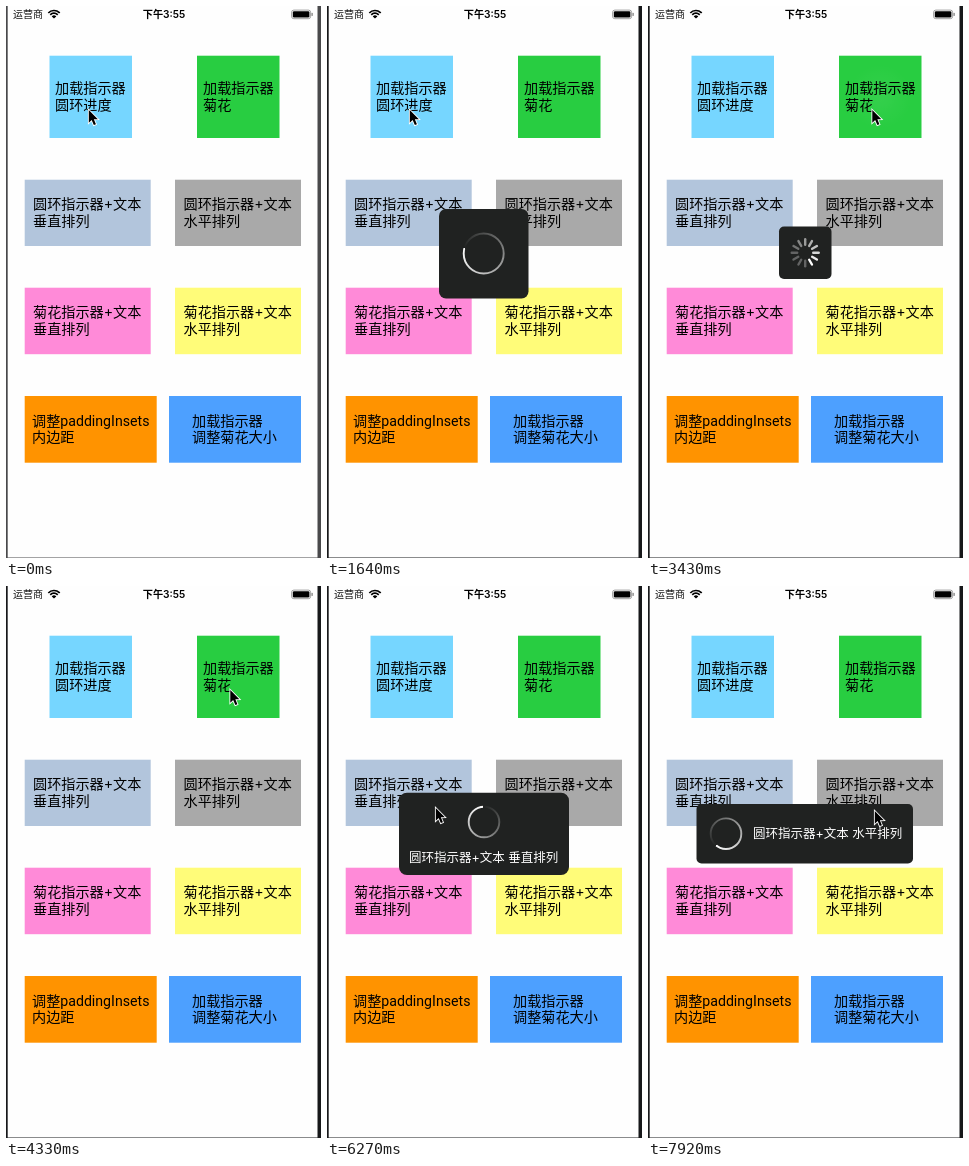
Recreate the animation shown at these times as an HTML page with a canvas. Size 315 by 552 pixels, loop 8000 ms.

```html
<!DOCTYPE html>
<html lang="zh">
<head>
<meta charset="utf-8">
<title>加载指示器</title>
<style>
html, body { margin: 0; width: 100%; height: 100%; overflow: hidden; background: #fff; }
canvas { display: block; width: 315px; height: 552px; }
</style>
</head>
<body>
<canvas id="stage"></canvas>
<script>
const W = 315, H = 552, LOOP = 8000;
const FONT = 'Inter, "Noto Sans CJK SC", "Noto Sans CJK", sans-serif';
const LATIN = 'Roboto, "Noto Sans CJK SC", "Noto Sans CJK", sans-serif';
const canvas = document.getElementById('stage');
const ratio = window.devicePixelRatio || 1;
canvas.width = W * ratio;
canvas.height = H * ratio;
const ctx = canvas.getContext('2d');
ctx.scale(ratio, ratio);

const buttons = [
  { x: 43.5, y: 49.7, w: 82.5, h: 82.3, color: '#76d6ff', tx: 49, lines: ['加载指示器', '圆环进度'] },
  { x: 191, y: 49.7, w: 82.5, h: 82.3, color: '#28cd41', tx: 197, lines: ['加载指示器', '菊花'] },
  { x: 18.7, y: 173.7, w: 126, h: 66.3, color: '#b2c5dc', tx: 27, lines: ['圆环指示器+文本', '垂直排列'] },
  { x: 169, y: 173.7, w: 126, h: 66.3, color: '#a9a9a9', tx: 177.5, lines: ['圆环指示器+文本', '水平排列'] },
  { x: 18.7, y: 281.7, w: 126, h: 66.5, color: '#ff8ad8', tx: 27, lines: ['菊花指示器+文本', '垂直排列'] },
  { x: 169, y: 281.7, w: 126, h: 66.5, color: '#fffc79', tx: 177.5, lines: ['菊花指示器+文本', '水平排列'] },
  { x: 18.7, y: 390, w: 132, h: 66.7, color: '#ff9300', tx: 26, font: LATIN, lines: ['调整paddingInsets', '内边距'] },
  { x: 163, y: 390, w: 132, h: 66.7, color: '#4da0ff', tx: 186, lines: ['加载指示器', '调整菊花大小'] }
];

// Touch glow per button: full from `on` to `off`, then fading.
const glows = [
  { button: 0, on: 740, off: 940 },
  { button: 1, on: 2980, off: 3150 },
  { button: 2, on: 5070, off: 5320 },
  { button: 3, on: 7170, off: 7300 }
];

// `head` is the ring's leading angle in degrees at time `at`.
const huds = [
  { from: 960, to: 2050, box: [112, 203, 89.5, 89.5, 7],
    ring: { x: 156.7, y: 247.5, r: 20, head: 195, at: 1640 } },
  { from: 3200, to: 4290, box: [131, 220.5, 52.5, 52.5, 5], petals: { x: 157.2, y: 246.8 } },
  { from: 5440, to: 6530, box: [72, 206.7, 170, 82.3, 8],
    ring: { x: 157, y: 236, r: 15.3, head: 265, at: 6270 },
    text: ['圆环指示器+文本 垂直排列', 82, 275.6] },
  { from: 7540, to: 9000, box: [48.5, 218, 216.5, 59.5, 5],
    ring: { x: 78, y: 247.7, r: 15.3, head: 130, at: 7920 },
    text: ['圆环指示器+文本 水平排列', 105, 252.2] }
];

// Pointer path: time, x, y
const path = [
  [0, 82, 103], [2380, 82, 103], [2830, 223.5, 103], [4330, 223.5, 103],
  [4480, 210.5, 125], [5070, 108, 221], [6420, 108, 221], [7020, 226, 224], [LOOP, 226, 224]
];

const clamp = v => Math.max(0, Math.min(1, v));
const ease = v => v * v * (3 - 2 * v);

// The screen refreshes every 150 ms.
function quantize(t) {
  if (t < 740) return 0;
  const base = t >= 5070 ? 5070 : t >= 2080 ? 2080 : 740;
  return base + Math.floor((t - base) / 150) * 150;
}

function label(text, x, y, size, color, family = FONT, weight = 400) {
  ctx.font = `${weight} ${size}px ${family}`;
  ctx.fillStyle = color;
  ctx.fillText(text, x, y);
}

function roundBox(x, y, w, h, r) {
  ctx.beginPath();
  ctx.roundRect(x, y, w, h, r);
}

function drawStatusBar() {
  label('运营商', 7, 12, 10, '#111');
  ctx.textAlign = 'center';
  label('下午3:55', 158, 11.9, 10.2, '#000', FONT, 600);
  ctx.textAlign = 'left';

  ctx.strokeStyle = ctx.fillStyle = '#000';
  ctx.lineWidth = 1.7;
  for (const r of [7.8, 5.1]) {
    ctx.beginPath();
    ctx.arc(48, 12.3, r, -Math.PI * 0.76, -Math.PI * 0.24);
    ctx.stroke();
  }
  ctx.beginPath();
  ctx.moveTo(48, 12.5);
  ctx.arc(48, 12.5, 3.1, -Math.PI * 0.76, -Math.PI * 0.24);
  ctx.fill();

  ctx.lineWidth = 0.7;
  ctx.strokeStyle = '#777';
  roundBox(285.6, 4.1, 19, 8.6, 2.2);
  ctx.stroke();
  roundBox(286.8, 5.3, 16.6, 6.2, 1.3);
  ctx.fill();
  ctx.fillStyle = '#777';
  ctx.fillRect(305.5, 6.9, 1.2, 3);
}

function drawGlow(b, alpha) {
  const x = b.x + b.w / 2, y = b.y + b.h / 2;
  const g = ctx.createRadialGradient(x, y, 0, x, y, 32);
  [[0, 0.85], [0.25, 0.7], [0.5, 0.42], [0.8, 0.16], [1, 0]]
    .forEach(([p, a]) => g.addColorStop(p, `rgba(255,255,255,${a * alpha})`));
  ctx.fillStyle = g;
  ctx.fillRect(x - 32, y - 32, 64, 64);
}

function drawButton(b, i, t) {
  ctx.fillStyle = b.color;
  ctx.fillRect(b.x, b.y, b.w, b.h);
  for (const g of glows) {
    if (g.button !== i || t < g.on) continue;
    const alpha = 1 - clamp((t - g.off) / 300);
    if (alpha > 0) drawGlow(b, alpha);
  }
  const mid = b.y + b.h / 2;
  b.lines.forEach((s, n) => label(s, b.tx, mid - 3.7 + n * 16.5, 14.15, '#000', b.font));
}

function drawRing({ x, y, r, head, at }, t) {
  const angle = (head + (t - at) * 0.36) * Math.PI / 180;
  const g = ctx.createConicGradient(angle, x, y);
  g.addColorStop(0, 'rgba(255,255,255,0)');
  g.addColorStop(1, '#fff');
  ctx.strokeStyle = g;
  ctx.lineWidth = 1.9;
  ctx.beginPath();
  ctx.arc(x, y, r, 0, Math.PI * 2);
  ctx.stroke();
}

function drawPetals({ x, y }, t) {
  const lead = Math.floor(t / 1000 * 12);
  ctx.lineCap = 'round';
  ctx.lineWidth = 2.4;
  for (let i = 0; i < 12; i++) {
    const age = ((lead - i) % 12 + 12) % 12;
    const a = i * Math.PI / 6 - Math.PI / 2, c = Math.cos(a), s = Math.sin(a);
    ctx.strokeStyle = `rgba(255,255,255,${Math.max(0.3, 1 - age * 0.09)})`;
    ctx.beginPath();
    ctx.moveTo(x + c * 8, y + s * 8);
    ctx.lineTo(x + c * 13.5, y + s * 13.5);
    ctx.stroke();
  }
  ctx.lineCap = 'butt';
}

function drawHud(h, t) {
  const alpha = Math.min(clamp((t - h.from) / 180), clamp((h.to - t) / 200));
  if (alpha <= 0) return;
  ctx.globalAlpha = alpha;
  ctx.fillStyle = '#202221';
  roundBox(...h.box);
  ctx.fill();
  if (h.ring) drawRing(h.ring, t);
  if (h.petals) drawPetals(h.petals, t);
  if (h.text) label(...h.text, 12.5, '#fff');
  ctx.globalAlpha = 1;
}

function pointerAt(t) {
  const i = path.findIndex(p => p[0] > t);
  const [t0, x0, y0] = path[i - 1], [t1, x1, y1] = path[i];
  const k = ease((t - t0) / (t1 - t0));
  return [x0 + (x1 - x0) * k, y0 + (y1 - y0) * k];
}

function drawPointer([x, y]) {
  ctx.save();
  ctx.translate(x + 0.8, y + 1);
  ctx.scale(0.87, 0.87);
  ctx.beginPath();
  [[0, 0], [0, 14.6], [3.3, 11.6], [5.8, 17.3], [8.2, 16.3], [5.8, 10.7], [10.4, 10.5]]
    .forEach(p => ctx.lineTo(...p));
  ctx.closePath();
  ctx.lineJoin = 'miter';
  ctx.lineWidth = 2;
  ctx.strokeStyle = '#fff';
  ctx.stroke();
  ctx.fillStyle = '#000';
  ctx.fill();
  ctx.restore();
}

function draw(t) {
  ctx.fillStyle = t < 740 ? '#49494b' : '#17181a';
  ctx.fillRect(0, 0, W, H);
  ctx.fillStyle = '#fefefe';
  ctx.fillRect(1.7, 0, 309.8, 551.5);
  drawStatusBar();
  buttons.forEach((b, i) => drawButton(b, i, t));
  huds.forEach(h => drawHud(h, t));
  drawPointer(pointerAt(t));
}

const start = performance.now();
function tick() {
  draw(quantize((performance.now() - start) % LOOP));
  requestAnimationFrame(tick);
}
tick();
</script>
</body>
</html>
```
